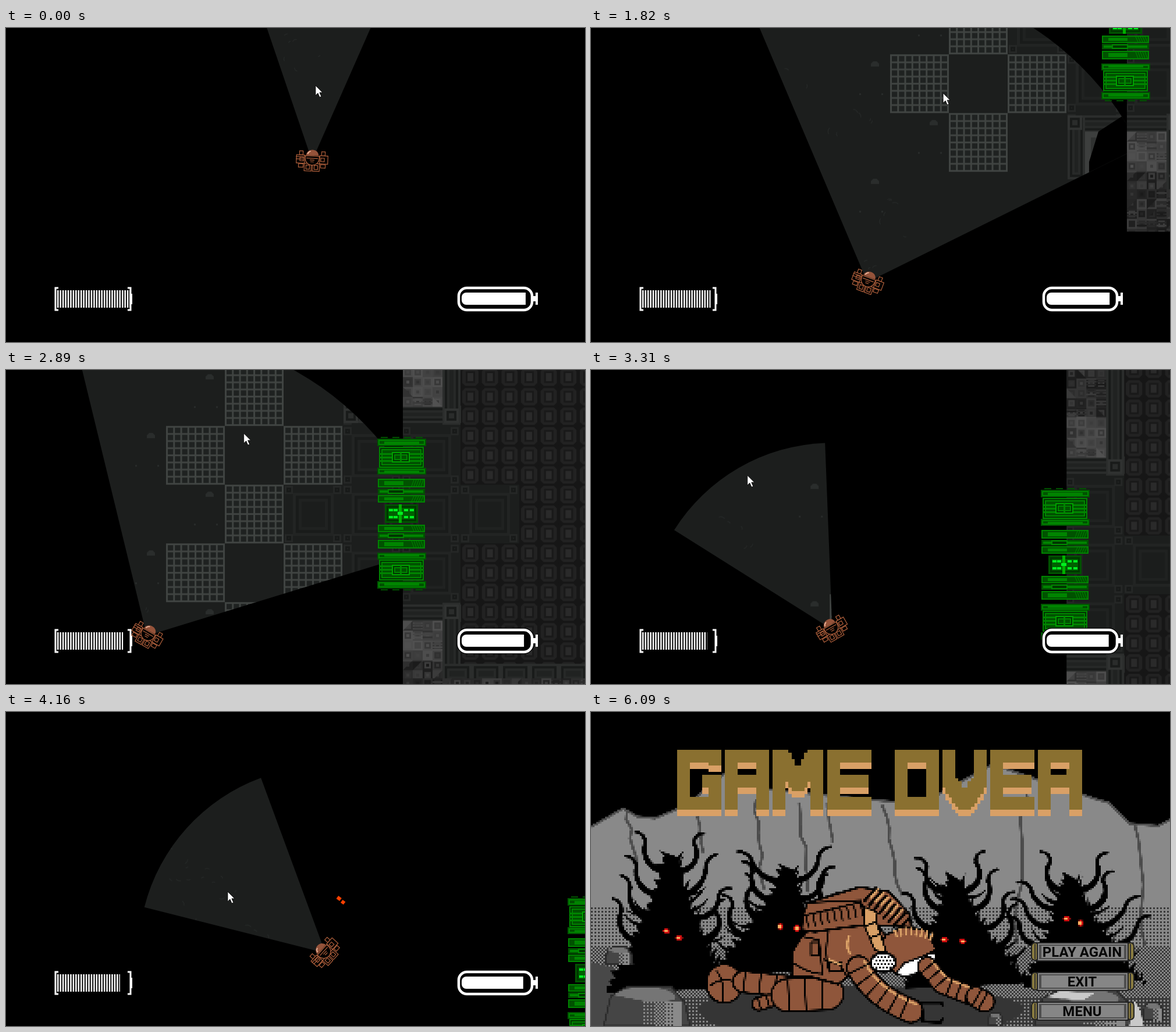
Animation of 995 by 540 pixels, one loop 6.33 s. Source, as an HTML page with a canvas:

```html
<!DOCTYPE html>
<html>
<head>
<meta charset="utf-8">
<style>
html, body { margin: 0; width: 100%; height: 100%; overflow: hidden; background: #000; }
canvas { display: block; }
</style>
</head>
<body>
<canvas id="stage" width="995" height="540"></canvas>
<script>
const W = 995, H = 540, LOOP = 6330, OVER = 4460, RAD = Math.PI / 180;
const BLACK = '#000', BROWN = '#8f563b', TAN = '#d9a066', GOLD = '#8a7030', RUST = '#b0603c';
const ctx = document.getElementById('stage').getContext('2d');

function layer(w, h) {
  const c = document.createElement('canvas');
  c.width = w; c.height = h;
  return c;
}
function seeded(s) {
  return () => (s = (s * 16807) % 2147483647) / 2147483647;
}
function rect(g, color, x, y, w, h) {
  g.fillStyle = color;
  g.fillRect(x, y, w, h);
}
function shape(g, d, fill, stroke, width = 3) {
  const p = new Path2D(d);
  if (fill) { g.fillStyle = fill; g.fill(p); }
  if (stroke) { g.strokeStyle = stroke; g.lineWidth = width; g.stroke(p); }
}
// Concentric rectangles, one colour per step inwards
function nest(g, x, y, w, h, step, ...colors) {
  colors.forEach((c, i) => rect(g, c, x + i * step, y + i * step, w - 2 * i * step, h - 2 * i * step));
}
const lerp = (a, b, u) => a + (b - a) * u;
const ramp = (t, from, to) => Math.min(1, Math.max(0, (t - from) / (to - from)));

// Values at time t from rows of [time, ...values], joined by Hermite curves
function track(keys, t) {
  let i = 0;
  while (i < keys.length - 2 && t >= keys[i + 1][0]) i++;
  const a = keys[i], b = keys[i + 1], p = keys[i - 1] || a, n = keys[i + 2] || b;
  const d = b[0] - a[0], u = ramp(t, a[0], b[0]);
  return a.slice(1).map((v, k) => {
    const w = b[k + 1];
    const m0 = (w - p[k + 1]) / (b[0] - p[0]) * d, m1 = (n[k + 1] - v) / (n[0] - a[0]) * d;
    return v + u * (m0 + u * (3 * (w - v) - 2 * m0 - m1 + u * (m0 + m1 - 2 * (w - v))));
  });
}

// time, view x, y, player x, y, aim in degrees, pointer x, y
const WALK = [
  [0, 248, -642, 526, 228, 2.5, 532, 99],
  [990, 213, -497, 491, 352, -3.4, 473, 74],
  [1820, 239, -253, 475, 437, 20.3, 605, 112],
  [2350, 130, -120, 395, 490, 36, 610, 190],
  [2890, 0, 0, 242, 457, 29.7, 409, 109],
  [3350, 150, 95, 430, 445, -35, 260, 190],
  [3720, 300, 156, 538, 429, -68.8, 236, 290],
  [OVER, 330, 230, 545, 405, -28, 496, 312]];

// ---------- level ----------
const LX = 160, LY = 180, TILE = 101;

function greeble(g, x, y, w, h, rnd) {
  const s = 17, tone = () => `hsl(0 0% ${10 + rnd() * 15}%)`;
  g.save();
  g.beginPath(); g.rect(x, y, w, h); g.clip();
  for (let j = y; j < y + h; j += s)
    for (let i = x; i < x + w; i += s) {
      const k = rnd();
      nest(g, i, j, s, s, 3, tone(), tone(), tone());
      if (k < .25) for (let n = 0; n < s; n += 5) rect(g, tone(), i, j + n, s, 3);
      else if (k < .4) shape(g, `M${i} ${j}h${s}l-${s} ${s}z`, tone());
    }
  g.restore();
}

function makeLevel() {
  const c = layer(1200, 1100), g = c.getContext('2d'), rnd = seeded(77);
  const cx = i => 376 + i * TILE, cy = j => 96 + j * TILE;
  g.translate(LX, LY);
  rect(g, '#1c1e1d', -LX, -LY, 1200, 1100);

  // cracks and crumbs on the floor
  for (let n = 0; n < 16; n++) {
    const x = -100 + rnd() * 440, y = n * 52;
    for (let i = 0; i < 6; i++) {
      const a = rnd() * 6.3, r = 10 + rnd() * 30;
      g.beginPath();
      g.arc(x + Math.cos(a) * r, y + Math.sin(a) * r, 4 + rnd() * 6, a, a + 1.2);
      g.strokeStyle = '#262928'; g.lineWidth = 1.5;
      g.stroke();
    }
  }
  for (let j = 0; j < 6; j++) {
    const x = 350 - j % 2 * TILE, y = 12 + j * TILE;
    shape(g, `M${x - 7} ${y + 4}v-5l4-4h6l4 4v5z`, '#2a2d2c');
    for (const dx of [-27, 11]) rect(g, '#292c2b', x + dx, y + 50, 3, 3);
  }

  // sunken slabs
  const slab = (i, j) => {
    const x = cx(i), y = cy(j);
    nest(g, x + 16, y + 14, 70, 74, 5, '#222423', '#191b1a', '#202221', '#1b1d1c');
    for (const a of [2, 85]) for (const b of [2, 85]) nest(g, x + a, y + b, 14, 14, 3, '#252726', '#181a19', '#222423');
  };
  for (let i = 1; i < 5; i++)
    for (let j = -1; j < 4; j++)
      if (j === 1 || i === 2 || (i === 3 && j >= 0 && j < 3)) slab(i, j);

  // plating beyond the door
  const p = TILE / 3;
  for (let j = -7; j < 13; j++)
    for (let i = 0; i < 8; i++) {
      if (j > 2 && j < 6 && i < 3) continue;
      const x = 781 + i * p, y = 96 + j * p;
      rect(g, '#161616', x, y, p, p);
      shape(g, `M${x + 8} ${y + 2}h18l5 5v20l-5 5h-18l-5-5v-20z`, '#222');
      nest(g, x + 9, y + 7, 16, 20, 3, '#191919', '#2a2a2a');
    }

  // walls and mouldings, mirrored about the door
  for (const s of [1, -1]) {
    g.save();
    g.translate(0, 247); g.scale(1, s);
    const edge = (x, y, w, h) => nest(g, x, y, w, h, 4, '#2b2d2c', '#191b1a', '#272928', '#202221');
    edge(580, 156, 202, 30);
    edge(580, 156, 30, 110);
    edge(750, 153, 31, 203);
    for (const x of [580, 753]) nest(g, x, 156, 25, 25, 4, '#303231', '#191b1a', '#2a2c2b');
    nest(g, 610, 184, 72, 180, 10, '#3d3f3e', '#303231');
    greeble(g, 682, 184, 68, 178, rnd);
    rect(g, '#ffffff18', 682, 184, 68, 70);
    if (s > 0) {
      for (let x = 750; x < 1040; x += 50) edge(x, 258, 50, 34);
      greeble(g, 682, 283, 358, 73, rnd);
    }
    g.restore();
  }

  // floor grates: two crosses sharing an arm
  const grate = (x, y) => {
    rect(g, '#1f2221', x, y, TILE, TILE);
    for (let o = 0; o < TILE; o += 12.25) {
      rect(g, '#404442', x + o, y, 3, TILE);
      rect(g, '#404442', x, y + o, TILE, 3);
    }
  };
  for (let j = -1; j < 4; j++)
    for (let i = -1; i < 2; i++)
      if ((i + j) % 2) grate(cx(i), cy(j));
  return c;
}

function makeDoor() {
  const c = layer(84, 265), g = c.getContext('2d');
  const mid = '#008400', dim = '#005200', deep = '#003600', glow = '#00f020';
  const bar = (y, h) => { nest(g, 0, y, 84, h, 2, dim, mid, dim); rect(g, mid, 12, y + 5, 60, h - 9); };
  const panel = (y, h) => {
    nest(g, 1, y, 81, h, 2, mid, dim);
    rect(g, mid, 12, y + 4, 33, h - 8);
    for (let x = 59; x < 78; x += 4) shape(g, `M${x} ${y + h - 2}l4 ${4 - h}`, null, mid, 1);
  };
  for (const s of [1, -1]) {
    g.save();
    g.translate(0, s < 0 ? 264 : 0); g.scale(1, s);
    for (let x = 6; x < 80; x += 20) rect(g, dim, x, 0, 12, 2);
    bar(3, 13);
    nest(g, 3, 17, 77, 36, 2, mid, deep, mid, dim);
    for (let y = 28; y < 42; y += 6) rect(g, mid, 5, y, 73, 3);
    nest(g, 25, 26, 31, 18, 2, '#00a000', deep, mid, dim);
    rect(g, mid, 39, 27, 3, 16);
    bar(53, 12);
    panel(72, 15);
    nest(g, 1, 89, 81, 10, 3, dim, mid);
    nest(g, 18, 90, 28, 8, 2, mid, deep, dim);
    panel(100, 13);
    g.restore();
  }
  nest(g, 13, 116, 57, 32, 3, dim, deep, '#006000');
  for (const y of [124, 136]) for (const x of [20, 28, 46, 56]) rect(g, glow, x, y, 7, 4);
  rect(g, '#00b000', 37, 116, 5, 32);
  rect(g, glow, 35, 129, 9, 5);
  return c;
}

function drawShip(x, y, angle) {
  const g = ctx;
  g.save();
  g.translate(x, y);
  g.rotate(angle);
  g.strokeStyle = RUST; g.lineWidth = 1.2;
  for (const s of [-1, 1])
    for (const [bx, by, w, h] of [[16, -16, 6, 7], [13, -9, 14, 14], [15, -5, 6, 6], [15, 6, 8, 6], [1, 5, 12, 13], [4, 8, 6, 7]]) {
      const left = s > 0 ? bx : -bx - w;
      rect(g, BLACK, left, by, w, h);
      g.strokeRect(left, by, w, h);
    }
  shape(g, 'M-28-6h14M-28-2h12', null, RUST, 1.2);
  shape(g, 'M-12-8C-13 3-7 7 0 8 8 7 13 2 12-8z', BLACK, RUST, 1.2);
  shape(g, 'M-10-4h20M-4-1h8M-3 2h6', null, RUST, 1.2);
  shape(g, 'M-11-9C-9-22 10-22 11-9z', '#95533a');
  shape(g, 'M-8-11Q-7-15-3-16', null, '#f2c0a8', 1.6);
  g.restore();
}

function drawHud(t) {
  const g = ctx, charge = 213 - t * .0041, air = 110 - t * .001;
  shape(g, 'M90 447H85V485H90M209 447H214V485H209', null, '#fff', 3);
  rect(g, '#fff', 214, 457, 3, 18);
  for (let x = 88; x < charge; x += 4.44) rect(g, '#fff', x, 451, Math.min(2.5, charge - x), 30);
  g.beginPath(); g.roundRect(778, 447, 126, 38, 14);
  g.fillStyle = BLACK; g.fill();
  for (const [color, w] of [[BLACK, 7], ['#fff', 4.5]]) { g.strokeStyle = color; g.lineWidth = w; g.stroke(); }
  g.beginPath(); g.roundRect(783, 455, air, 21, [8, 0, 0, 8]);
  g.fillStyle = '#fff'; g.fill();
  rect(g, '#fff', 905, 461, 6, 9);
  rect(g, '#fff', 910, 455, 4, 21);
}

function drawGame(t, [ox, oy, px, py, aim]) {
  const g = ctx, wide = ramp(t, 1200, 1420) - ramp(t, 2960, 3220);
  const spread = (21.3 + 22 * wide + 6.5 * ramp(t, 2960, 3220)) * RAD, a = (aim - 90) * RAD;
  const lit = path => {
    g.save();
    g.beginPath(); path(); g.clip();
    g.drawImage(level, ox - LX, oy - LY);
  };
  lit(() => { g.moveTo(px, py); g.arc(px, py, 321 + 201 * wide, a - spread, a + spread); });
  // shadow thrown by the lower wall
  const wall = [[633, 431], [617, 483], [617, 603]].map(([x, y]) => [x + ox, y + oy]);
  const far = wall.map(([x, y]) => [lerp(px, x, 4), lerp(py, y, 4)]).reverse();
  shape(g, 'M' + wall.concat(far).join('L') + 'z', BLACK);
  g.restore();
  lit(() => g.rect(682 + ox, oy - 115, 400, 718));
  g.restore();

  g.drawImage(door, Math.round(638 + ox), Math.round(115 + oy));
  if (t > 3420) {
    const u = ramp(t, 3420, OVER);
    g.save();
    g.translate(lerp(712, 520, u), lerp(203, 373, u)); g.rotate(37 * RAD);
    rect(g, '#ff4000', -8, -4, 7, 6);
    rect(g, '#ff4000', 2, -3, 6, 6);
    g.restore();
  }
  drawShip(px, py, aim * RAD);
  drawHud(t);
}

// ---------- end screen ----------
// Letters are pen strokes on a coarse grid, drawn with a 4 x 4 nib
const STROKES = {
  G: '10 1,10 0,0 0,0 15,10 15,10 8,8 8', A: '0 15,0 0,10 0,10 15;0 8,10 8', M: '0 15,0 0,1 0,6 9,11 0,12 0,12 15',
  E: '10 0,0 0,0 15,10 15;0 8,9 8', O: '0 0,10 0,10 15,0 15,0 0', V: '0 0,0 8,5 15,10 8,10 0',
  R: '0 15,0 0,10 0,10 5,9 7,10 9,10 15;0 8,9 8'
};
function drawTitle(g) {
  const u = 5.42;
  [...'GAME OVER'].forEach((ch, n) => {
    const left = 148 + n * 82 + (n > 2 ? 12 : 0) - (n > 4 ? 48 : 0);
    for (const [color, drop] of [[TAN, 11], [GOLD, 0]])
      for (const line of (STROKES[ch] || '').split(';').filter(Boolean)) {
        const pts = line.split(',').map(p => p.split(' ').map(Number));
        for (let i = 1; i < pts.length; i++)
          for (let k = 0; k <= 15; k++) {
            const [x, y] = [0, 1].map(c => Math.round(lerp(pts[i - 1][c], pts[i][c], k / 15)));
            rect(g, color, Math.round(left + x * u), Math.round(65 + y * u) + drop, 22, 22);
          }
      }
  });
}

function dither(g, color, x, y, w, h, level) {
  const order = [0, .5, .75, .25];
  for (let j = y - y % 3; j < y + h; j += 3)
    for (let i = x - x % 3; i < x + w; i += 3)
      if (order[i / 3 % 2 + 2 * (j / 3 % 2)] < level((i - x) / w, (j - y) / h)) rect(g, color, i, j, 3, 3);
}

// A ragged cone with curling, tapering arms
function monster(g, seed, x, top, left, right, base, ex, ey, gap, slant) {
  const rnd = seeded(seed);
  const side = (s, f) => [lerp(x, s < 0 ? left : right, .1 + .9 * f ** 1.4), lerp(top, base, f)];
  const outline = [];
  for (const s of [-1, 1])
    for (let k = 0; k <= 18; k++) {
      const f = s < 0 ? 1 - k / 18 : k / 18, [px, py] = side(s, f);
      outline.push([px, py + 4], [px + s * (2 + rnd() * 10), py - 5 - rnd() * 8]);
    }
  shape(g, 'M' + outline.join('L') + 'z', BLACK);
  g.lineCap = 'round';
  for (const s of [-1, 1])
    for (let k = 0; k < 9; k++) {
      const big = k < 4, steps = big ? 13 : 5;
      let [px, py] = side(s, big ? .12 + k * .17 : rnd() * .8), a = .5 - rnd() * .6, turn = .12 + rnd() * .12;
      for (let n = 0; n < steps; n++) {
        const nx = px + s * Math.cos(a) * 7, ny = py - Math.sin(a) * 7;
        shape(g, `M${px} ${py}L${nx} ${ny}`, null, BLACK, big ? 11 - n * .5 : 6 - n);
        px = nx; py = ny;
        a += n < 8 ? turn : -turn * 2;
      }
    }
  for (const k of [0, 1]) {
    const cx = ex + k * gap, cy = ey + k * slant;
    shape(g, `M${cx - 6} ${cy}l4-5h5l4 5-4 5h-5z`, '#d01010');
    rect(g, '#ffb060', cx - 3, cy - 2, 6, 4);
  }
}

function rock(g, x, y, w, h) {
  shape(g, `M${x} ${y + h}l${w * .08} ${-h * .75} ${w * .2} ${-h * .25}h${w * .5}l${w * .16} ${h * .4} ${w * .06} ${h * .6}z`, '#454545', '#2c2c2c');
  dither(g, '#8a8a8a', x + w * .45 | 0, y + h * .4 | 0, w * .45 | 0, h * .6 | 0, u => u * .9);
  shape(g, `M${x + w * .12} ${y + h * .22}q${w * .1} ${-h * .2} ${w * .36} ${-h * .2}t${w * .34} ${h * .2}-${w * .35} ${h * .15}z`, '#757575');
}

function diver(g, lift) {
  g.lineJoin = 'round';
  const line = (d, w = 3, color = BLACK) => shape(g, d, null, color, w);
  const suit = d => shape(g, d, BROWN, BLACK, 4);
  const dashes = (d, w, on, off, color = BLACK) => {
    g.lineCap = 'butt'; g.setLineDash([on, off]);
    line(d, w, color);
    g.setLineDash([]);
  };
  // A padded tube with seams across it
  const limb = (d, w, seam, shine) => {
    g.lineCap = 'round';
    line(d, w);
    line(d, w - 7, BROWN);
    if (shine) { g.save(); g.translate(w * .22, -w * .25); line(d, 4, TAN); g.restore(); }
    if (seam) dashes(d, w - 7, 3, seam);
  };
  limb('M229 464v6', 64);
  line('M206 470q20-16 46-4M216 446q14 16 10 50');
  limb('M262 464L340 472', 40, 24);
  limb('M288 502L306 497', 26, 12);
  limb('M338 487L406 484', 60, 26);
  suit('M345 455L346 412 362 386 385 368 440 352 490 365 520 400 500 440 440 456 425 468 380 456z');
  line('M362 386l30 6 6 60M378 396h14v22h-14zM408 378q-8 40 2 70M398 425l30 10 12 20M345 430q30 20 50 20M410 430h20v16h-20z');
  line('M444 385q-8 18 2 32M408 425l22 10', 4, TAN);
  // backpack with slats and hoses
  suit('M364 350L372 328 462 301 512 309 548 348 550 370 480 366 440 370 385 378 362 375z');
  dashes('M370 360L470 340', 22, 3, 9);
  line('M366 350L464 327 480 366M372 328l92-4');
  dashes('M478 312L540 366', 34, 5, 6);
  dashes('M486 310L530 348', 22, 4, 7, TAN);
  // helmet, strap, visor and speaker
  suit('M494 412L506 384 536 370 574 374 594 408 566 424 530 452 506 440z');
  dashes('M522 382Q550 370 588 388', 14, 4, 5, TAN);
  shape(g, 'M523 451L538 432 590 413 593 424 566 447 542 455z', '#fff', BLACK);
  shape(g, 'M470 335V368L488 410 508 414 490 360 492 345z', TAN, BLACK);
  line('M472 368l20-8M480 388l18-6');
  shape(g, 'M480 431q4-18 24-16 20 2 20 16-4 16-22 16-20-2-22-16z', '#fff', BLACK, 4);
  for (let y = 420; y < 446; y += 6) for (let x = 486; x < 520; x += 6) rect(g, BLACK, x + y % 4, y, 3, 3);
  // arms
  limb('M578 438L604 468 650 486', 36, 14, true);
  limb('M662 490L676 498', 38, 9);
  g.save();
  g.translate(0, -lift);
  limb('M460 440Q484 488 550 514', 44, 18, true);
  line('M568 500h34l4 6M570 514v18l30 2 6-8', 5);
  g.restore();
}

function makeEnd(lift) {
  const c = layer(W, H), g = c.getContext('2d'), rnd = seeded(4242);
  rect(g, BLACK, 0, 0, W, H);
  shape(g, 'M-9 203L55 166 80 180 110 183 165 160 230 106 310 134 470 150 560 158 600 140 690 90 760 114 868 150 890 156 926 192 975 196 1005 180V550H-9z', '#898989', '#505050', 4);
  // cracks wander down from the ridge
  for (const [x, y, drop, drift] of [[62, 170, 125, 18], [183, 178, 64, 8], [284, 150, 155, 10], [358, 155, 155, 16],
    [406, 155, 70, 8], [500, 160, 156, 31], [744, 110, 290, -8], [934, 192, 210, 20]]) {
    let d = `M${x} ${y}`;
    for (let k = 1; k <= 8; k++) d += `L${x + drift * k / 8 + (rnd() - .5) * drop / 16} ${y + drop * k / 8}`;
    shape(g, d, null, '#4c4c4c', 5);
  }
  dither(g, '#383838', 0, 333, W, H - 333, (u, v) => .05 + v * .6);
  shape(g, 'M0 430L40 440 60 480 30 540H0z', '#484848');
  shape(g, 'M185 510Q210 470 460 472 680 470 745 505 740 530 690 540H220Q190 530 185 510z', '#353535');

  monster(g, 11, 138, 245, 28, 238, 480, 129, 377, 22, 11);
  monster(g, 23, 342, 268, 205, 410, 452, 325, 369, 28, 3);
  monster(g, 37, 622, 286, 540, 757, 472, 607, 391, 31, 3);
  monster(g, 59, 822, 284, 745, 950, 470, 817, 355, 24, 8);

  rock(g, 24, 404, 48, 30);
  rock(g, 22, 472, 148, 68);
  rock(g, 682, 518, 26, 20);
  rock(g, 762, 476, 175, 64);
  rock(g, 948, 500, 36, 30);
  shape(g, 'M785 490l20-10 60 4-20 12zM925 540l8-45 12 20 4 25z', '#c9c9c9');
  diver(g, lift);

  // sample to coarse pixels
  const small = layer(332, 180), s = small.getContext('2d');
  s.imageSmoothingEnabled = g.imageSmoothingEnabled = false;
  s.drawImage(c, 0, 0, 996, 540, 0, 0, 332, 180);
  g.drawImage(small, 0, 0, 996, 540);
  drawTitle(g);
  return c;
}

function drawButton(label, y, hot) {
  const g = ctx, face = hot ? '#9a4a4e' : '#868686', rim = hot ? '#6e2a2e' : '#4e4e4e', trim = hot ? '#a8483c' : '#8a7c40';
  for (const x of [757, 921]) {
    g.beginPath(); g.roundRect(x, y - 15, 12, 30, 6);
    g.fillStyle = trim; g.fill();
    g.strokeStyle = '#222'; g.lineWidth = 2; g.stroke();
    rect(g, '#333', x + 5, y - 13, 2, 26);
  }
  nest(g, 766, y - 16, 158, 33, 2, '#222', face, rim, face);
  for (const x of [772, 916]) rect(g, rim, x, y - 10, 2, 21);
  g.fillStyle = '#080808';
  g.font = 'bold 24px Roboto, sans-serif';
  g.textAlign = 'center';
  g.fillText(label, 844, y + 9);
}

function drawEnd(t, mx, my) {
  const twitch = [5420, 5970].some(s => t >= s && t < s + 120);
  ctx.drawImage(ends[+twitch], 0, 0);
  ['PLAY AGAIN', 'EXIT', 'MENU'].forEach((label, i) => {
    const y = 412 + i * 51;
    drawButton(label, y, mx > 757 && mx < 933 && Math.abs(my - y) < 25);
  });
}

const level = makeLevel(), door = makeDoor(), ends = [makeEnd(0), makeEnd(4)];
const start = performance.now();

function frame(now) {
  const t = Math.max(0, now - start) % LOOP, pose = track(WALK, t);
  let [mx, my] = pose.slice(5);
  rect(ctx, BLACK, 0, 0, W, H);
  if (t < OVER) drawGame(t, pose);
  else {
    // over the menu, then out through the bottom
    const u = ramp(t, 4640, 4930), v = ramp(t, 4930, 5200);
    mx = lerp(496, 822, u) + 130 * Math.sin(v * 2);
    my = lerp(312, 432, u) + 130 * v;
    drawEnd(t, mx, my);
  }
  shape(ctx, `M${mx} ${my}v17l4-4 3 7 3-1-3-7h5z`, '#fff', BLACK, .8);
  requestAnimationFrame(frame);
}
requestAnimationFrame(frame);
</script>
</body>
</html>
```
